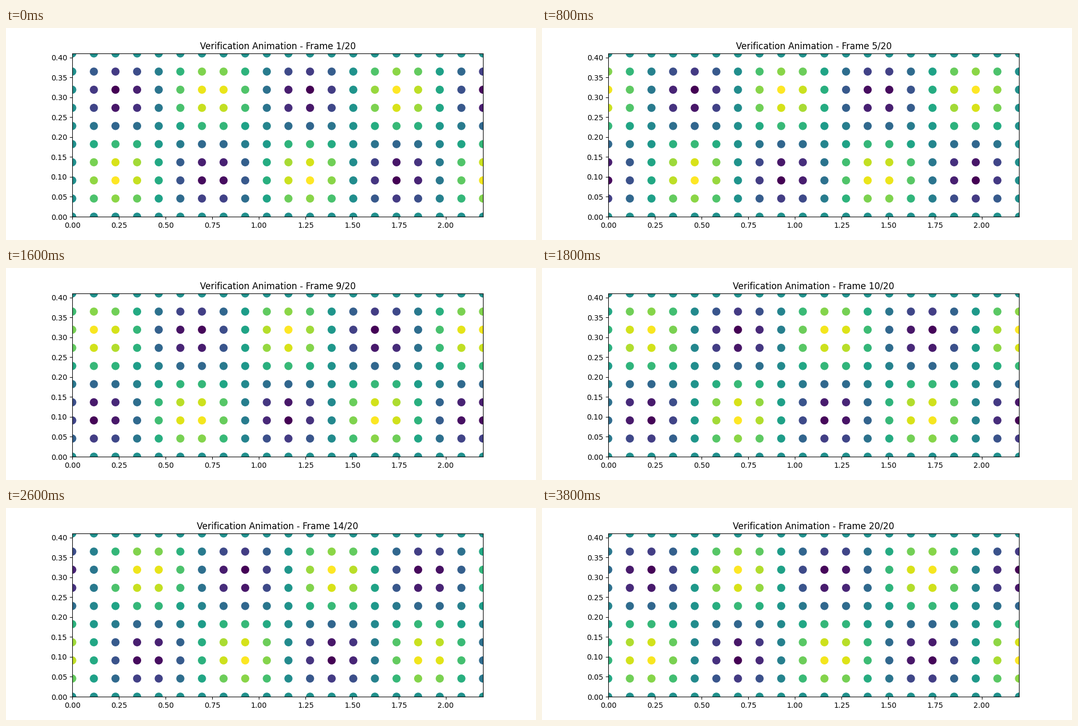
These frames come from a looping animation (1000x400 px, 4000 ms). A matplotlib script:

```python
import numpy as np
import matplotlib.pyplot as plt
from matplotlib.animation import FuncAnimation

FRAMES = 20
LENGTH, HEIGHT = 2.2, 0.41

x, y = np.meshgrid(np.linspace(0, LENGTH, 20), np.linspace(0, HEIGHT, 10))
x, y = x.ravel(), y.ravel()


def wave(i):
    """Standing profile in y, travelling to the right in x."""
    return np.sin(2 * np.pi * (x - i / FRAMES)) * np.sin(2 * np.pi * y / HEIGHT)


fig, ax = plt.subplots(figsize=(10, 4), dpi=100)
dots = ax.scatter(x, y, c=wave(0), cmap="viridis", s=100)
ax.set_xlim(0, LENGTH)
ax.set_ylim(0, HEIGHT)
title = ax.set_title("")


def update(i):
    values = wave(i)
    dots.set_array(values)
    dots.set_clim(values.min(), values.max())
    title.set_text(f"Verification Animation - Frame {i + 1}/{FRAMES}")
    return dots, title


anim = FuncAnimation(fig, update, frames=FRAMES, interval=200,
                     init_func=lambda: update(0), repeat=True, blit=False)
plt.show()
```
